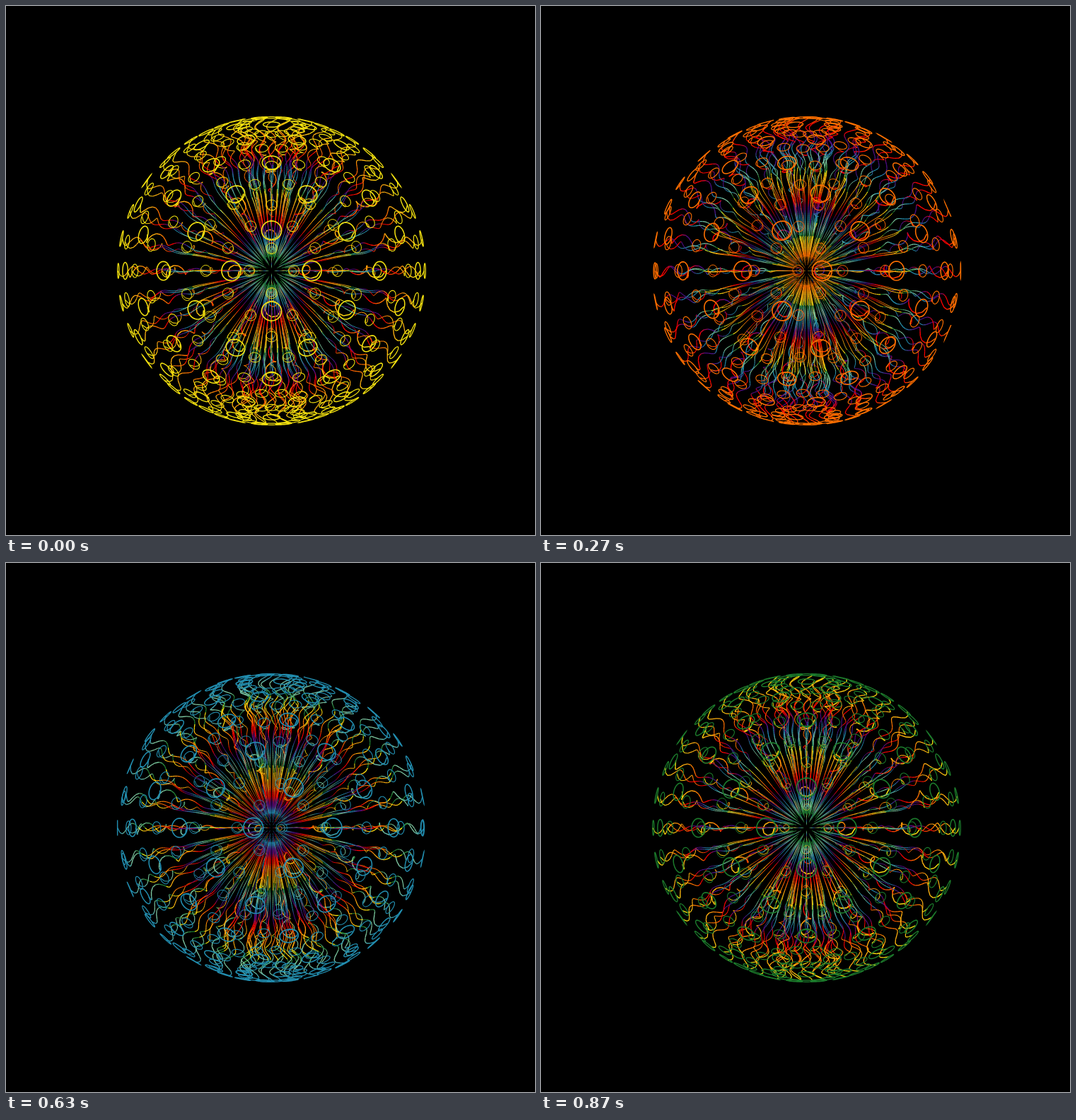
Recreate the animation shown at these times as an HTML page with a canvas. Size 748 px wide and 748 px high, loop 900 ms.

```html
<!DOCTYPE html>
<html>
<head>
<meta charset="utf-8">
<style>
  html, body { margin: 0; width: 100%; height: 100%; overflow: hidden; background: #000; }
  canvas { display: block; }
</style>
</head>
<body>
<canvas width="748" height="748"></canvas>
<script>
const ctx = document.querySelector('canvas').getContext('2d');
const TAU = Math.PI * 2, STEP = TAU / 32;
const CENTER = [375.5, 374.5], EYE = 3.4, ZOOM = 708;
const RING = 0.048, COIL = 0.042, TURNS = 3, CORE = 0.1, PIECES = 64;
const FRAMES = 30, FRAME_MS = 30;
const stops = [
  [28, 124, 44], [128, 202, 164], [34, 142, 176], [80, 14, 136],
  [255, 0, 0], [255, 112, 0], [255, 176, 16], [244, 226, 16]
];

function color(s) {
  const p = s * 7, i = Math.min(6, Math.floor(p));
  // Steep blends keep each band close to its pure colour.
  const f = Math.min(1, Math.max(0, (p - i - 0.2) / 0.6));
  return `rgb(${stops[i].map((c, k) => Math.round(c + (stops[i + 1][k] - c) * f))})`;
}

function project([x, y, z]) {
  const scale = ZOOM / (EYE - z);
  return [CENTER[0] + x * scale, CENTER[1] - y * scale, scale];
}

function makeSpoke(lat, lon) {
  const sa = Math.sin(lat), ca = Math.cos(lat), so = Math.sin(lon), co = Math.cos(lon);
  const out = [ca * so, sa, ca * co], east = [co, 0, -so], north = [-sa * so, ca, -sa * co];
  // Point at distance v along the spoke, turned by angle around it.
  const point = (v, radius, angle) => project(out.map((o, k) =>
    o * v + radius * (Math.cos(angle) * east[k] + Math.sin(angle) * north[k])));
  return { depth: out[2], point };
}

const lineWidth = scale => scale / 175;

// A straight thread that winds into a widening coil near the surface.
function drawThread({ point }, t) {
  const at = v => point(v, COIL * v ** 4, TAU * TURNS * v ** 3);
  let from = at(CORE);
  for (let i = 1; i <= PIECES; i++) {
    const v = CORE + (1 - CORE) * i / PIECES;
    const to = at(v);
    const s = 2 * (i - 0.5) / PIECES - t;
    ctx.strokeStyle = color(s - Math.floor(s));
    ctx.lineWidth = lineWidth(to[2]) * (0.4 + 0.6 * v);
    ctx.beginPath();
    ctx.moveTo(from[0], from[1]);
    ctx.lineTo(to[0], to[1]);
    ctx.stroke();
    from = to;
  }
}

function drawRing({ point }, t) {
  ctx.strokeStyle = color(1 - t);
  ctx.lineWidth = lineWidth(point(1, 0, 0)[2]);
  ctx.beginPath();
  for (let i = 0; i < 28; i++) {
    const [x, y] = point(1, RING, TAU * i / 28);
    ctx.lineTo(x, y);
  }
  ctx.closePath();
  ctx.stroke();
}

function draw(t) {
  ctx.fillStyle = '#000';
  ctx.fillRect(0, 0, 748, 748);
  const spokes = [];
  for (let row = -7; row <= 7; row++) {
    for (let i = 0; i < 16; i++) {
      const offset = row % 2 ? 0 : 1;
      spokes.push(makeSpoke(row * STEP, (2 * i + offset - 2 * t) * STEP));
    }
  }
  // Threads seen end-on go first, so the outline's colour bands stay clear.
  spokes.sort((a, b) => Math.abs(b.depth) - Math.abs(a.depth));
  for (const spoke of spokes) drawThread(spoke, t);
  spokes.sort((a, b) => a.depth - b.depth);
  for (const spoke of spokes) drawRing(spoke, t);
}

let shown = -1;
function tick() {
  const frame = Math.floor(performance.now() / FRAME_MS) % FRAMES;
  if (frame !== shown) {
    shown = frame;
    draw(frame / (FRAMES - 1));
  }
  requestAnimationFrame(tick);
}
tick();
</script>
</body>
</html>
```
